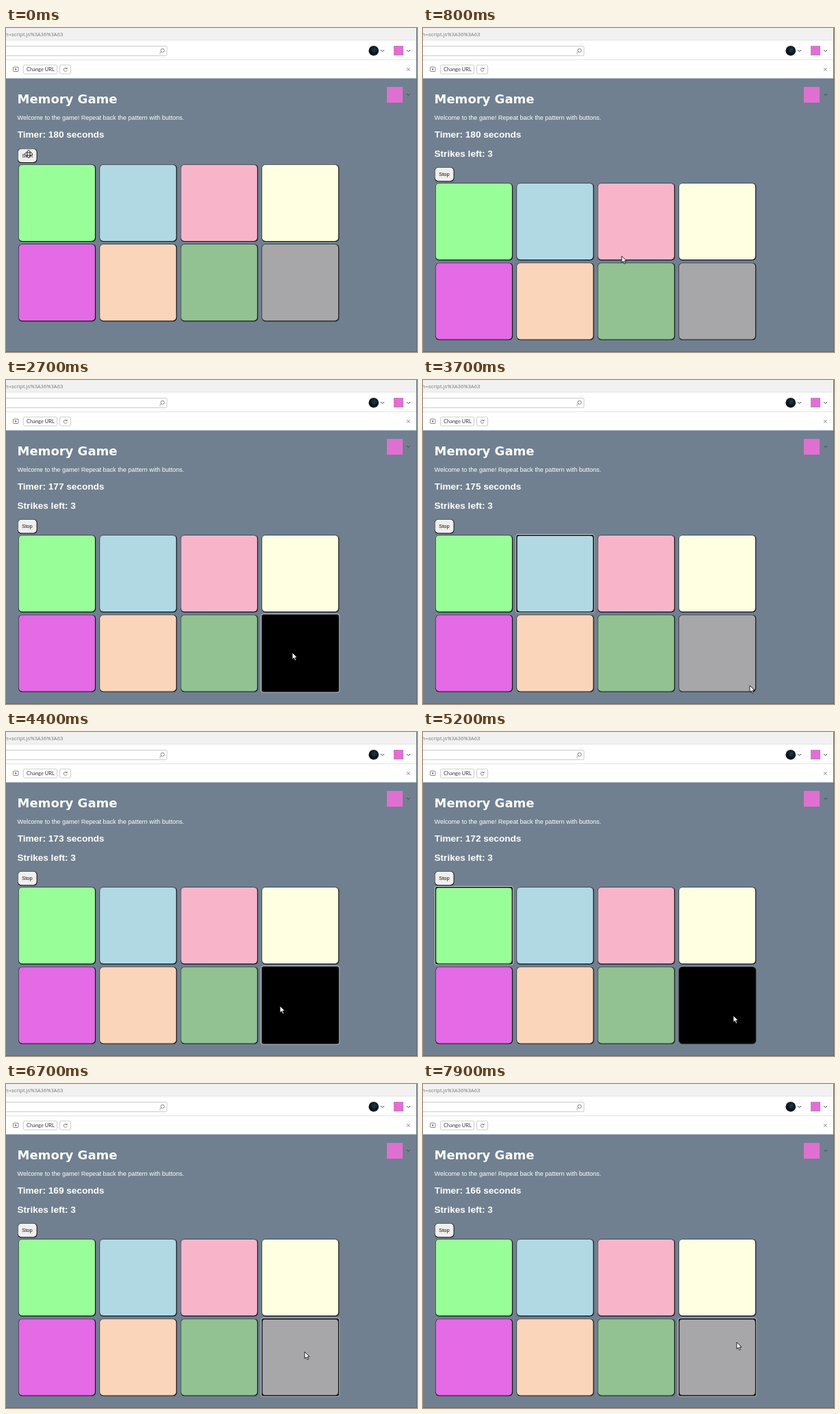
An HTML page for the animation above (8000 ms loop, 600x473 px).

```html
<!DOCTYPE html>
<html lang="en">
<head>
<meta charset="utf-8">
<title>Memory Game</title>
<style>
  html, body { margin: 0; width: 100%; height: 100%; overflow: hidden; background: #708090; }
  svg { display: block; width: 600px; height: 473px; }
  .page { font-family: "Liberation Sans", Arial, sans-serif; fill: #fff; }
  .title { font: bold 18px "DejaVu Sans", Verdana, sans-serif; }
  .intro { font-size: 9.08px; }
  .sub { font-size: 13.6px; font-weight: bold; }
  .label { font-size: 7.5px; fill: #111; }
  .address { font: 7.6px "Open Sans", sans-serif; fill: #777; }
  .tool { font: 7.5px Lato, sans-serif; fill: #333; }
  .box { fill: #fff; stroke: #ccc; }
  .icon { fill: none; stroke: #777; stroke-width: .9; }
  .chevron { fill: none; stroke: #444; stroke-width: 1; }
</style>
</head>
<body>
<svg viewBox="0 0 600 473">
  <defs>
    <radialGradient id="night" cx=".55" cy=".4">
      <stop offset="0" stop-color="#1d3a4b"/>
      <stop offset="1" stop-color="#060b12"/>
    </radialGradient>
  </defs>
  <rect width="600" height="473" fill="#708090"/>

  <g id="browser">
    <rect width="600" height="73.5" fill="#fff"/>
    <rect width="600" height="17.5" fill="#f1f1f2"/>
    <path d="M0 17.8H600M0 46.3H600" stroke="#e2e2e4"/>
    <text class="address" x="-1" y="12">h=script.js%3A36%3A63</text>
    <rect class="box" x="-6" y="26.5" width="241" height="14" rx="2"/>
    <circle class="icon" cx="228.5" cy="32.8" r="2.6"/>
    <path class="icon" d="M226.6 34.8l-2.4 2.6"/>
    <rect class="icon" x="10.5" y="57" width="7.5" height="6.5" rx="1"/>
    <path d="M13.2 58.5v3.6l2.8-1.8z" fill="#777"/>
    <rect class="box" x="25.5" y="54" width="49" height="13" rx="2"/>
    <text class="tool" x="30" y="63">Change URL</text>
    <rect class="box" x="78.5" y="54" width="16" height="13" rx="2"/>
    <path class="icon" d="M88.8 59.4a2.5 2.5 0 1 0 .3 2.2M89.2 57.6v2h-2"/>
    <path class="icon" d="M585.2 58.2l4.4 4.4m0-4.4l-4.4 4.4"/>
    <circle cx="536.8" cy="33.2" r="7.3" fill="url(#night)"/>
    <rect x="566" y="26" width="14" height="14" fill="#e070d0"/>
    <rect x="556" y="86" width="23" height="23" fill="#e070d0"/>
    <path class="chevron" d="M547 32l2.5 2.5 2.5-2.5M585 32l2.5 2.5 2.5-2.5M585 96l2.5 2.5 2.5-2.5"/>
    <path d="M599.5 0V473M0 472.5H600" stroke="#5d6a78"/>
  </g>

  <g class="page">
    <text class="title" x="16.5" y="110">Memory Game</text>
    <text class="intro" x="16.5" y="134">Welcome to the game! Repeat back the pattern with buttons.</text>
    <text class="sub" id="timer" x="16.7" y="160"></text>
    <text class="sub" id="strikes" x="16.5" y="187.5">Strikes left: 3</text>
    <g id="game">
      <rect x="17" y="176" width="28.6" height="21" rx="5.2" fill="#111"/>
      <rect x="17.6" y="176.6" width="27" height="19.4" rx="4.7" fill="#efefef"/>
      <text class="label" id="toggle" x="23.2" y="189"></text>
      <g id="tiles"></g>
    </g>
  </g>

  <path id="mover" fill="#fff" stroke="#111" stroke-width=".9"
        d="M0-6l2.5 3H1v2h2v-1.5L6 0 3 2.5V1H1v2h1.5L0 6l-2.5-3H-1V1h-2v1.5L-6 0l3-2.5V-1h2v-2h-1.5z"/>
  <path id="arrow" fill="#fff" stroke="#111" stroke-width=".9" stroke-linejoin="round"
        d="M0 0V9.8L2.3 7.7 3.9 11.4 5.6 10.7 4 7.1H7.1Z"/>
</svg>
<script>
const LOOP = 8000, STEP = 100, START = 300, FIRST_TICK = 800, TICK = 500;
const GREEN = 0, BLUE = 1, GREY = 7;
const COLORS = ['#98ff98', '#b0d9e3', '#f8b5ca', '#ffffe2', '#e46ae6', '#fad5ba', '#92c192', '#a7a7a9'];
const LIT = { [GREEN]: '#008000', [BLUE]: '#0000ff', [GREY]: '#000' };

// Lit spans: start, end, tile
const CLUES = [
  [900, 1100, GREY],
  [2000, 2200, GREY], [2300, 2500, BLUE],
  [3800, 3900, GREY], [4000, 4100, BLUE], [4200, 4300, GREEN],
  [5200, 5400, GREY], [5500, 5700, BLUE], [5800, 6000, GREEN], [6100, 6300, GREY]
];
const CLICKS = [
  [1400, 1500, GREY],
  [2700, 2800, GREY], [3300, 3400, BLUE],
  [4400, 4500, GREY], [4600, 4700, BLUE], [4800, 4900, GREEN],
  [6500, 6600, GREY], [6900, 7000, BLUE], [7100, 7200, GREEN], [7400, 7500, GREY]
];
// Pointer stops: time, x, y
const PATH = [
  [0, 33, 184], [400, 33, 184], [1000, 380, 385], [1400, 402, 402], [1700, 402, 402],
  [2400, 418, 398], [2800, 418, 398], [3200, 225, 310], [3400, 225, 310], [3700, 477, 446],
  [4100, 430, 420], [4400, 400, 400], [4600, 220, 315], [4800, 100, 305], [4900, 100, 305],
  [5200, 453, 414], [6300, 438, 394], [6700, 436, 391], [6900, 225, 310], [7100, 105, 305],
  [7400, 425, 390], [7900, 458, 377], [8000, 458, 377]
];

const NS = 'http://www.w3.org/2000/svg';
const $ = id => document.getElementById(id);

function add(parent, tag, attrs = {}) {
  const node = document.createElementNS(NS, tag);
  for (const name in attrs) node.setAttribute(name, attrs[name]);
  return parent.appendChild(node);
}

const tiles = COLORS.map((color, i) => {
  const x = 18 + (i % 4) * 118.4, y = 199 + Math.floor(i / 4) * 116.3;
  const box = (parent, inset, size, attrs) =>
    add(parent, 'rect', { x: x + inset, y: y + inset, width: size, height: size, ...attrs });
  const outline = (parent, inset, size, stroke, width) =>
    box(parent, inset, size, { rx: 2.5, fill: 'none', stroke, 'stroke-width': width });

  box($('tiles'), .2, 112.9, { rx: 5.3, fill: '#151515' });
  const face = box($('tiles'), .7, 111.2, { rx: 5, fill: color });
  const ring = add($('tiles'), 'g');
  outline(ring, -.6, 114, '#e8e8e8', .9);
  outline(ring, .5, 111.9, '#101010', 1.4);
  return { face, ring, color };
});

function pointerAt(t) {
  const next = Math.max(1, PATH.findIndex(stop => stop[0] > t));
  const [t0, x0, y0] = PATH[next - 1], [t1, x1, y1] = PATH[next];
  const u = (t - t0) / (t1 - t0), ease = u * u * (3 - 2 * u);
  return [x0 + (x1 - x0) * ease, y0 + (y1 - y0) * ease];
}

function show(element, visible) {
  element.setAttribute('visibility', visible ? 'visible' : 'hidden');
}

function render(t) {
  const playing = t >= START;
  const elapsed = Math.max(0, Math.floor((t - FIRST_TICK) / TICK));
  $('timer').textContent = `Timer: ${180 - elapsed} seconds`;
  $('toggle').textContent = playing ? 'Stop' : 'Start';
  $('game').setAttribute('transform', `translate(0 ${playing ? 27.2 : 0})`);
  show($('strikes'), playing);

  const lit = [...CLUES, ...CLICKS].find(([from, to]) => t >= from && t < to);
  const clicked = CLICKS.filter(([from]) => t >= from).pop();
  tiles.forEach(({ face, ring, color }, i) => {
    face.setAttribute('fill', lit && lit[2] === i ? LIT[i] : color);
    show(ring, clicked && clicked[2] === i);
  });

  const [x, y] = pointerAt(t);
  for (const id of ['mover', 'arrow']) {
    $(id).setAttribute('transform', `translate(${x} ${y})`);
    show($(id), (id === 'arrow') === playing);
  }
}

const begin = performance.now();
function frame() {
  const t = (performance.now() - begin) % LOOP;
  render(Math.floor(t / STEP) * STEP);
  requestAnimationFrame(frame);
}
frame();
</script>
</body>
</html>
```
